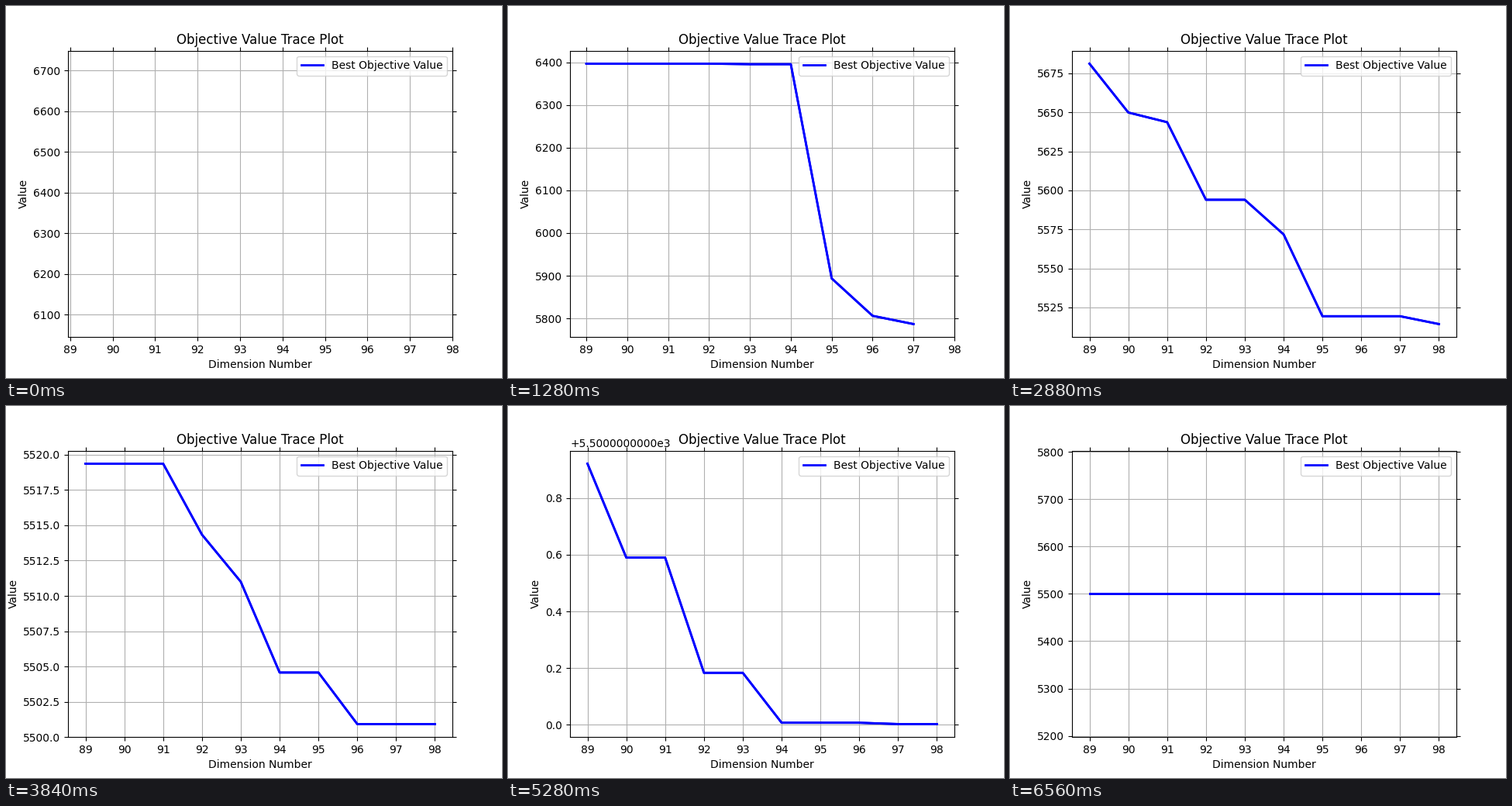
Animation, 640 px wide and 480 px high, one loop 8000 ms. Source, as a matplotlib script:

```python
import math

import matplotlib.pyplot as plt
from matplotlib.animation import FuncAnimation
from matplotlib.ticker import MultipleLocator, ScalarFormatter

FRAMES, STEP_MS = 50, 160
FIRST_X, WINDOW = 89, 10
OPTIMUM = 5500

# Gap to the optimum at each improving step; it holds in between
GAPS = {0: 897.1, 4: 895.8, 6: 393.6, 7: 306, 8: 286.7, 9: 181.2,
        10: 149.9, 11: 143.7, 12: 94, 14: 71.8, 15: 19.365, 18: 14.34,
        19: 11, 20: 4.572, 22: 0.922, 25: 0.59, 27: 0.1831, 29: 0.0067,
        32: 0.002}


def best(step):
    return OPTIMUM + min(gap for s, gap in GAPS.items() if s <= step)


class OffsetFormatter(ScalarFormatter):
    """Writes the axis offset with ten decimals."""

    def get_offset(self):
        if len(self.locs) == 0 or not self.offset:
            return ""
        exp = math.floor(math.log10(abs(self.offset)))
        return f"{self.offset / 10 ** exp:+.10f}e{exp}"


fig, ax = plt.subplots(figsize=(6.4, 4.8), dpi=100)
# Two coincident strokes give the trace its firmer edge
lines = [ax.plot([], [], color="blue", lw=2)[0] for _ in range(2)]
lines[0].set_label("Best Objective Value")
ax.set_title("Objective Value Trace Plot")
ax.set_xlabel("Dimension Number")
ax.set_ylabel("Value")
ax.xaxis.set_major_locator(MultipleLocator(1))
ax.yaxis.set_major_formatter(OffsetFormatter())
ax.tick_params(top=True, right=True)
ax.grid(True)
ax.legend(loc="upper right")


def update(i):
    ys = [best(s) for s in range(max(0, i - WINDOW + 1), i + 1)]
    xs = [FIRST_X + k for k in range(len(ys))]
    for line in lines:
        line.set_data(xs, ys)

    # The right edge stays put until the window is full
    margin = 0.05 * max(1, len(ys) - 1)
    last_x = FIRST_X + WINDOW - 1
    ax.set_xlim(FIRST_X - margin,
                last_x + (margin if len(ys) == WINDOW else 0))
    ax.relim()
    ax.autoscale_view(scalex=False)
    return lines


anim = FuncAnimation(fig, update, frames=FRAMES, interval=STEP_MS,
                     init_func=lambda: update(0), repeat=True,
                     repeat_delay=0, blit=False)
plt.show()
```
